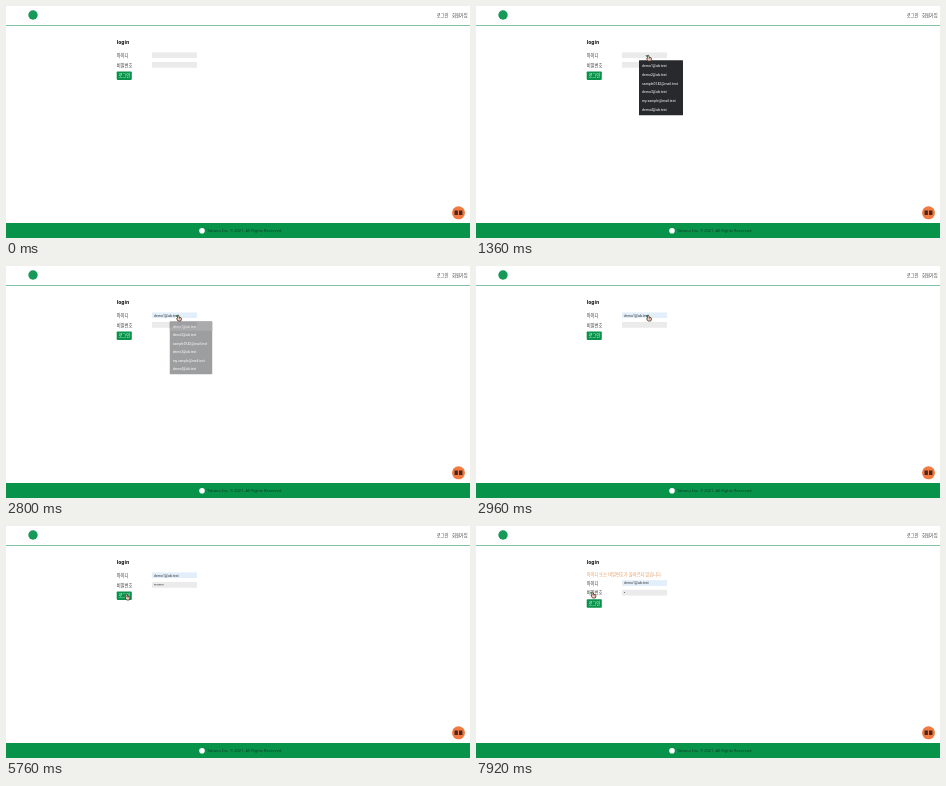
Animation of 464x232 px, one loop 8000 ms. Source, as an HTML page:

```html
<!DOCTYPE html>
<html>
<head>
<meta charset="utf-8">
<style>
  html, body { margin: 0; width: 100%; height: 100%; overflow: hidden; background: #fff; }
  svg { display: block; width: 464px; height: 232px; }
  text { font: 4.25px "Noto Sans CJK KR", "Noto Sans CJK", "Noto Sans", sans-serif; fill: #333; }
  .mail { font: 3.5px Roboto, sans-serif; }
  .title { font: bold 5px "Noto Sans", sans-serif; fill: #111; }
  .footer { font: 4px "Noto Sans", sans-serif; fill: #123d27; }
  .white { fill: #fff; }
  .error { fill: #e7995c; }
</style>
</head>
<body>
<svg viewBox="0 0 464 232">
  <circle cx="27" cy="9" r="4.7" fill="#159a59"/>
  <text x="430.8" y="11">로그인</text>
  <text x="446" y="11">회원가입</text>
  <rect y="19" width="464" height="1" fill="#82c3a5"/>

  <text class="title" x="110.7" y="38.4">login</text>
  <text class="error" id="error" x="110.7" y="50">아이디 또는 비밀번호가 올바르지 않습니다.</text>
  <g id="form">
    <text x="110.7" y="51">아이디</text>
    <text x="110.7" y="60.6">비밀번호</text>
    <rect id="idField" x="146" y="46.4" width="45" height="5.7"/>
    <rect x="146" y="56" width="45" height="5.8" fill="#ebebeb"/>
    <text class="mail" id="idText" x="148" y="50.5">demo1@ab.test</text>
    <rect id="selection" x="147.8" y="56.8" width="10" height="4.2" fill="#8fb8ee"/>
    <g id="dots" fill="#444"></g>
    <rect x="110.7" y="65.5" width="15.1" height="8.4" rx=".8" fill="#07944a"/>
    <text class="white" x="112.4" y="71.3">로그인</text>
  </g>

  <rect y="217" width="464" height="15" fill="#07944a"/>
  <circle cx="196" cy="224.7" r="2.8" fill="#fff"/>
  <text class="footer" x="201" y="226.2">Tobanu Inc. © 2021. All Rights Reserved</text>
  <circle cx="452.5" cy="206.8" r="6.5" fill="#f07a42"/>
  <path d="M448.5 204.5h3.4v4.6h-3.4zM453 204.5h3.4v4.6h-3.4z" fill="#49271c"/>

  <g id="menu"></g>
  <g id="cursor">
    <path d="M-3.5-3l2.2.5-1.4 1.5z" fill="#2c8c5a"/>
    <path d="M-1.7-2.4Q-.7-3.2 0-2.2V-.6Q2.6-1 2.5 1L1.8 3H-1L-2.4.6-1.3.2z"
          fill="#f3ddd0" stroke="#4b3029" stroke-width=".8"/>
    <path d="M-.2.8h1.5" stroke="#c84c36" stroke-width=".8"/>
  </g>
</svg>
<script>
const $ = id => document.getElementById(id);
const show = (id, on) => $(id).style.display = on ? '' : 'none';

const mails = ['demo1@ab.test', 'demo2@ab.test', 'sample0142@mail.test',
               'demo3@ab.test', 'my.sample@mail.test', 'demo4@ab.test'];
$('menu').innerHTML = '<rect x="163" y="54.3" width="44" height="55" rx=".6" fill="#28292c"/>' +
  '<rect id="hover" x="163" y="55" width="44" height="9" fill="#46474b"/>' +
  mails.map((m, i) => `<text class="mail white" x="166" y="${61.2 + i * 8.75}">${m}</text>`).join('');

const keyTimes = [3360, 3520, 3600, 3760, 3840, 4000, 4080, 4320];
$('dots').innerHTML = keyTimes.map((_, i) =>
  `<circle cx="${148.6 + i * 1.22}" cy="58.8" r=".5"/>`).join('');

// Pointer path: time, x, y
const path = [[560, 380, 76], [800, 218, 53], [960, 173, 52], [4640, 173, 52],
  [5280, 155, 61], [5520, 155, 61], [5760, 121.5, 71], [5920, 118.5, 71],
  [6240, 118.5, 71], [7120, 160, 69], [7360, 117.5, 69], [8000, 117.5, 69]];

function pointerAt(t) {
  const i = Math.max(1, path.findIndex(p => p[0] >= t));
  const [t0, x0, y0] = path[i - 1], [t1, x1, y1] = path[i];
  const k = (t - t0) / (t1 - t0);
  return [x0 + (x1 - x0) * k, y0 + (y1 - y0) * k];
}

function draw(now) {
  const t = Math.floor(now % 8000 / 80) * 80;
  const failed = t >= 6320, retyped = t >= 7920;

  show('cursor', t >= 560);
  if (t >= 560) $('cursor').setAttribute('transform', `translate(${pointerAt(t)})`);

  const fade = Math.min(1, Math.max(0, (t - 2640) / 320));
  show('menu', t >= 1360 && fade < 1);
  show('hover', t >= 2400);
  $('menu').setAttribute('opacity', 1 - fade * 1.1);
  $('menu').setAttribute('transform', `translate(185 82) scale(${1 - fade * .07}) translate(-185 -82)`);

  show('idText', t >= 2400);
  $('idField').setAttribute('fill', t >= 2400 ? '#e3eefb' : '#ebebeb');
  [...$('dots').children].forEach((dot, i) =>
    dot.style.display = t >= keyTimes[i] && (!retyped || i < 1) ? '' : 'none');
  show('selection', t >= 7200 && !retyped);
  show('error', failed);
  $('form').setAttribute('transform', `translate(0 ${failed ? 7.8 : 0})`);
  requestAnimationFrame(draw);
}
requestAnimationFrame(draw);
</script>
</body>
</html>
```
